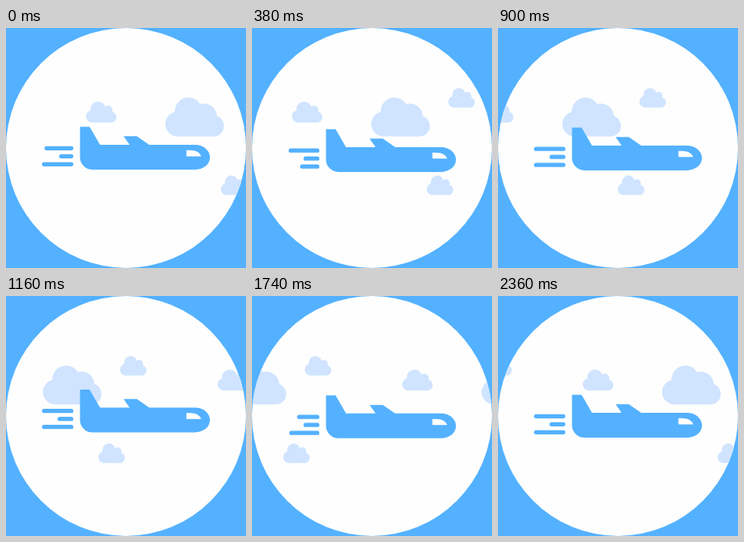
Recreate the animation shown at these times as an HTML page. Size 300x300 px, loop 2.38 s.

```html
<!DOCTYPE html>
<html lang="en">
<head>
<meta charset="utf-8">
<title>Plane in the clouds</title>
<style>
  html, body { margin: 0; width: 100%; height: 100%; overflow: hidden; background: #53b1ff; }
  svg { display: block; width: 100vw; height: 100vh; }
</style>
</head>
<body>
<svg viewBox="0 0 300 300">
  <defs>
    <clipPath id="disc"><circle cx="150" cy="150" r="150"/></clipPath>
    <g id="big">
      <circle cx="15.5" cy="120" r="15.5"/>
      <circle cx="29" cy="104.2" r="17.2"/>
      <circle cx="48" cy="111" r="16.5"/>
      <circle cx="60.2" cy="122.4" r="13.1"/>
      <path d="M15.5 108H60V135.5H15.5z"/>
    </g>
    <g id="small">
      <circle cx="7.8" cy="18.5" r="7.8"/>
      <circle cx="15.2" cy="9.6" r="9.6"/>
      <circle cx="27.6" cy="10.7" r="5.6"/>
      <circle cx="31.2" cy="19.4" r="6.9"/>
      <path d="M7.8 12H31V26.3H7.8z"/>
    </g>
    <g id="sky">
      <use href="#big" x="199.2"/>
      <use href="#small" x="100" y="92"/>
      <use href="#small" transform="translate(295.6 75) scale(.87 .93)"/>
      <use href="#small" transform="translate(268.6 184.3) scale(.87 .93)"/>
    </g>
  </defs>

  <circle cx="150" cy="150" r="150" fill="#fefefe"/>
  <g clip-path="url(#disc)" fill="#d0e4ff">
    <g id="clouds">
      <use href="#sky"/>
      <use href="#sky" x="317.5"/>
    </g>
  </g>

  <g id="plane" fill="#53b1ff">
    <path d="M92.5 123.5H104.5L117.5 146H154.5L147 135.3H163.5L179 146H236C247.5 146 255 153.5 255 161.7S247.5 177 236 177H108A15.5 15.5 0 0 1 92.5 161.5z"/>
    <path d="M225.5 152.8H230C237.5 152.8 242.5 155.8 244 160.4H225.5z" fill="#fefefe"/>
    <rect class="trail" y="147.7" height="5.2" rx="2.6"/>
    <rect class="trail" y="157.7" height="5.2" rx="2.6"/>
    <rect class="trail" y="167.7" height="5.2" rx="2.6"/>
  </g>
</svg>
<script>
  const LOOP = 2380, STEP = 20, DRIFT = 0.132, TRAIL_END = 84.2, HALF = 200;

  // [time, vertical offset]
  const bob = [[0, 0], [700, 5.1], [1200, -6.8], [2040, 4], [LOOP, 0]];

  // full length and the moments each trail is shortest
  const trails = [
    { len: 39.2, dips: [184, 1882] },
    { len: 19.8, dips: [180, 1948] },
    { len: 39.2, dips: [257, 1932] }
  ];

  const clouds = document.getElementById('clouds');
  const plane = document.getElementById('plane');
  const bars = document.querySelectorAll('.trail');
  const smooth = u => u * u * (3 - 2 * u);

  function bobAt(t) {
    const i = bob.findIndex(k => k[0] > t);
    const [t0, y0] = bob[i - 1], [t1, y1] = bob[i];
    return y0 + (y1 - y0) * smooth((t - t0) / (t1 - t0));
  }

  function draw(t) {
    clouds.setAttribute('transform', `translate(${-DRIFT * t} 0)`);
    plane.setAttribute('transform', `translate(0 ${bobAt(t)})`);
    trails.forEach(({ len, dips }, i) => {
      const w = len * Math.min(1, ...dips.map(d => Math.abs(t - d) / HALF));
      bars[i].setAttribute('x', TRAIL_END - w);
      bars[i].setAttribute('width', w);
    });
  }

  const start = performance.now();
  function tick() {
    const t = (performance.now() - start) % LOOP;
    draw(Math.floor(t / STEP) * STEP);
    requestAnimationFrame(tick);
  }
  tick();
</script>
</body>
</html>
```
